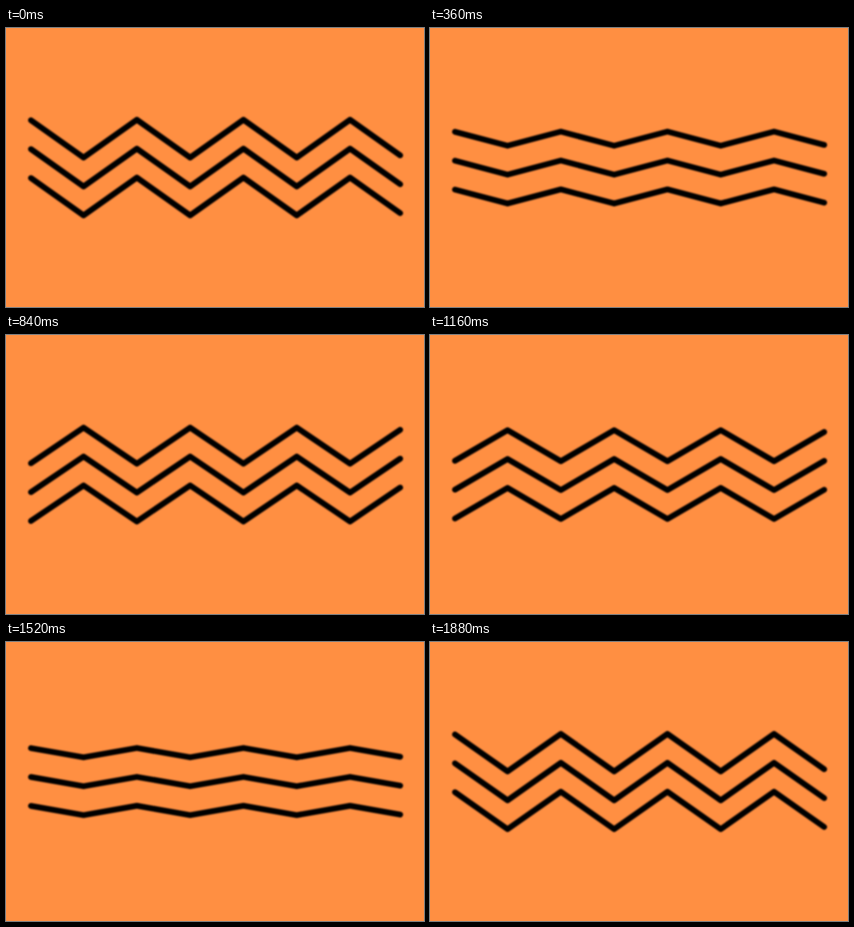
Animation of 720x480 px, one loop 1.92 s. Source, as an HTML page:

```html
<!DOCTYPE html>
<html lang="en">
<head>
<meta charset="utf-8">
<title>Zigzag waves</title>
<style>
  html, body { margin: 0; width: 100%; height: 100%; overflow: hidden; background: #ff8f42; }
  svg { display: block; width: 720px; height: 480px; }
  #waves {
    fill: none;
    stroke: #000;
    stroke-width: 10;
    stroke-linecap: round;
    stroke-linejoin: round;
    filter: blur(1.4px);
  }
</style>
</head>
<body>
<svg viewBox="0 0 720 480"><path id="waves"/></svg>
<script>
  const LOOP = 1920, STEP = 40;
  const ROWS = 3, TOP = 190.4, GAP = 49.7;
  const ORIGIN = 41.8, PITCH = 91.8, CORNERS = 8;
  const LEFT = 43, RIGHT = 679;
  const waves = document.getElementById('waves');

  // Triangle wave from -1 to 1, with a corner at every PITCH
  const triangle = x => 1 - 2 * Math.abs(1 - ((x - ORIGIN) / PITCH) % 2);

  const xs = Array.from({ length: CORNERS }, (_, i) =>
    Math.min(RIGHT, Math.max(LEFT, ORIGIN + i * PITCH)));

  function zigzag(y, swing) {
    return 'M' + xs.map(x => `${x} ${y + swing * triangle(x)}`).join('L');
  }

  function draw(time) {
    const t = Math.floor((time % LOOP) / STEP) * STEP;
    const swing = 33 * Math.cos(2 * Math.PI * t / LOOP) - 0.5;
    let d = '';
    for (let row = 0; row < ROWS; row++) d += zigzag(TOP + row * GAP, swing);
    waves.setAttribute('d', d);
  }

  const start = performance.now();
  function tick() {
    draw(performance.now() - start);
    requestAnimationFrame(tick);
  }
  tick();
</script>
</body>
</html>
```
